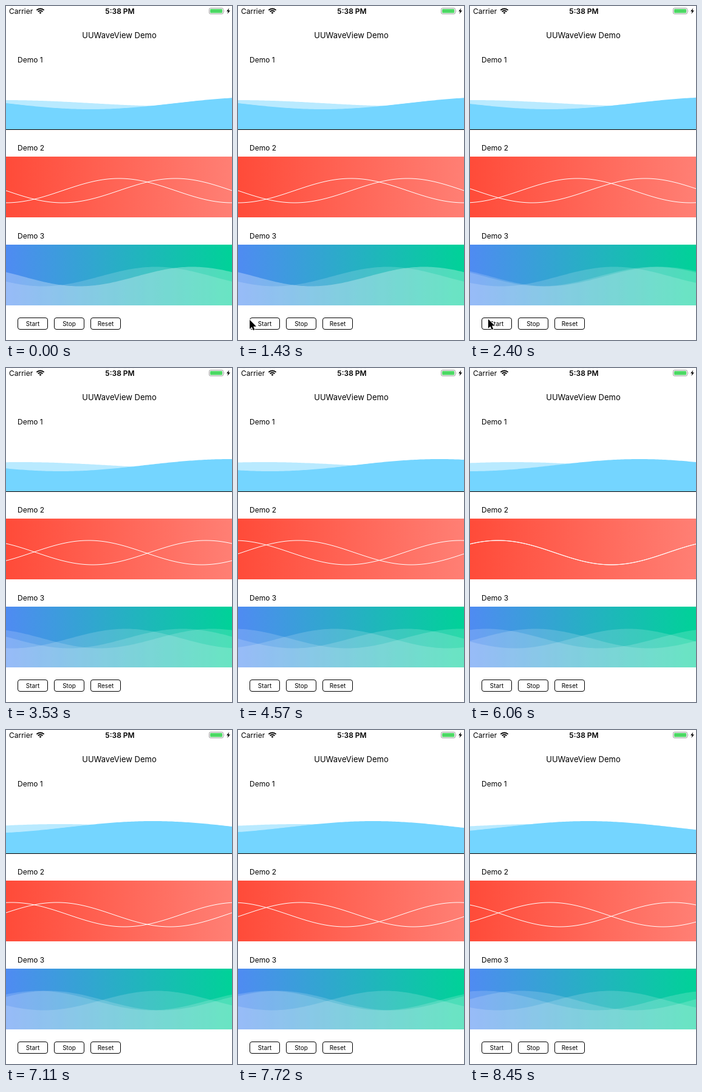
An HTML page that plays this animation: 372x550 px, repeating every 8550 ms.

```html
<!DOCTYPE html>
<html lang="en">
<head>
<meta charset="utf-8">
<title>Wave view demo</title>
<style>
  html, body { margin: 0; width: 100%; height: 100%; overflow: hidden; background: #fff; }
  svg { display: block; font-family: Inter, Roboto, sans-serif; font-size: 12px; }
  .buttons { font-size: 10px; text-anchor: middle; }
  .buttons rect { fill: none; stroke: #000; }
</style>
</head>
<body>
<svg width="372" height="550" viewBox="0 0 372 550">
  <defs>
    <linearGradient id="red"><stop stop-color="#ff4b39"/><stop offset="1" stop-color="#ff7f74"/></linearGradient>
    <linearGradient id="sea"><stop stop-color="#4f8bf2"/><stop offset="1" stop-color="#00d298"/></linearGradient>
  </defs>

  <!-- status bar -->
  <text x="5" y="12.5">Carrier</text>
  <g fill="none" stroke="#000" stroke-width="2">
    <path d="M50.4 6.9a8.7 8.7 0 0 1 12.2 0M52.7 9.4a5.4 5.4 0 0 1 7.6 0"/>
    <path d="M56.5 13l-2-2a2.8 2.8 0 0 1 4 0z" fill="#000" stroke="none"/>
  </g>
  <text x="187.5" y="12.5" text-anchor="middle" font-weight="600">5:38 PM</text>
  <rect x="334.5" y="3.5" width="23" height="9.5" rx="2" fill="none" stroke="#999"/>
  <rect x="336" y="5" width="20" height="6.5" rx="1" fill="#4cd964"/>
  <path d="M359 6.5q1.5 1.7 0 3.5z" fill="#999"/>
  <path d="M367.3 3.5l-4.3 5.2h2.6l-1.2 4.3 4.6-5.5h-2.8z"/>

  <text x="186.5" y="53" text-anchor="middle" font-size="13">UUWaveView Demo</text>
  <text x="19" y="92.5">Demo 1</text>
  <text x="19" y="237.5">Demo 2</text>
  <text x="19" y="382.5">Demo 3</text>

  <rect y="248" width="372" height="100" fill="url(#red)"/>
  <rect y="393" width="372" height="100" fill="url(#sea)"/>
  <g id="waves"></g>
  <path d="M0 203.5h372" stroke="#000"/>

  <g class="buttons">
    <rect x="19.5" y="513.5" width="49" height="19" rx="3.5"/><text x="44" y="526.7">Start</text>
    <rect x="79.5" y="513.5" width="49" height="19" rx="3.5"/><text x="104" y="526.7">Stop</text>
    <rect x="139.5" y="513.5" width="49" height="19" rx="3.5"/><text x="164" y="526.7">Reset</text>
  </g>

  <circle id="click" cx="31.5" cy="515.5" r="9.5" fill="none" stroke="#000"/>
  <path id="cursor" d="M0 0V15l3.5-3.2 2.4 5.4 2.4-1-2.3-5.3h4.8z"
        stroke="#fff" stroke-width="1.6" paint-order="stroke"/>
</svg>
<script>
const LOOP = 8550, WIDTH = 372, STEP = 87;
const SPEED = 0.0355; // px per ms of the fastest waves
const BURSTS = [2130, 3010, 3880, 4740, 5620, 6500, 7380, 8360];

// crest: x of a crest at rest; rate: relative speed, negative runs left
const blue = { length: 558, mid: 160, bottom: 203, fill: '#74d5ff' };
const line = { length: 372, mid: 304, amp: 20, fill: 'none', stroke: '#fff' };
const veil = { length: 372, mid: 445.5, amp: 16, bottom: 493, fill: '#fff', 'fill-opacity': 0.16 };
const waves = [
  { ...blue, amp: 5, crest: 0, rate: 0.5, 'fill-opacity': 0.5 },
  { ...blue, amp: 10, crest: 418.5, rate: -1 },
  { ...line, crest: 186, rate: -1 },
  { ...line, crest: 279, rate: 1 },
  { ...veil, crest: 247, rate: -1 },
  { ...veil, crest: 307, rate: 2 / 3 },
  { ...veil, crest: 307, rate: -1 / 3 },
];

const $ = id => document.getElementById(id);
for (const wave of waves) {
  wave.path = document.createElementNS('http://www.w3.org/2000/svg', 'path');
  for (const name of ['fill', 'fill-opacity', 'stroke'])
    if (name in wave) wave.path.setAttribute(name, wave[name]);
  $('waves').append(wave.path);
}

function wavePath({ length, mid, amp, crest, rate, bottom }, travel) {
  const points = [];
  for (let x = 0; x <= WIDTH; x += 3) {
    const angle = 2 * Math.PI * (x - crest - rate * travel) / length;
    points.push(x + ' ' + (mid - amp * Math.cos(angle)).toFixed(2));
  }
  return 'M' + points.join('L') + (bottom ? `V${bottom}H0Z` : '');
}

function travelAt(t) {
  const start = BURSTS.findLast(s => s <= t);
  if (!start) return 0;
  const step = Math.min(9, Math.floor((t - start) / 86));
  return SPEED * (start + step * STEP - 2125);
}

// 0 = off the left edge, 1 = resting on the Start button
function cursorReach(t) {
  const stepped = (from, count) =>
    Math.min(1, Math.max(0, (Math.floor((t - from) / STEP) + 1) / count));
  const enter = 1 - (1 - stepped(1170, 8)) ** 2;
  return t < 3010 ? enter : 1 - stepped(3010, 4);
}

function draw(now) {
  const t = now % LOOP;
  const travel = travelAt(t);
  for (const wave of waves) wave.path.setAttribute('d', wavePath(wave, travel));

  const reach = cursorReach(t);
  const y = t < 3010 ? 520 - 4.3 * reach : 515.7;
  $('cursor').setAttribute('transform', `translate(${-13 + 43 * reach} ${y})`);
  $('click').setAttribute('visibility', t >= 1960 && t < 2130 ? 'visible' : 'hidden');
  requestAnimationFrame(draw);
}
draw(performance.now());
</script>
</body>
</html>
```
